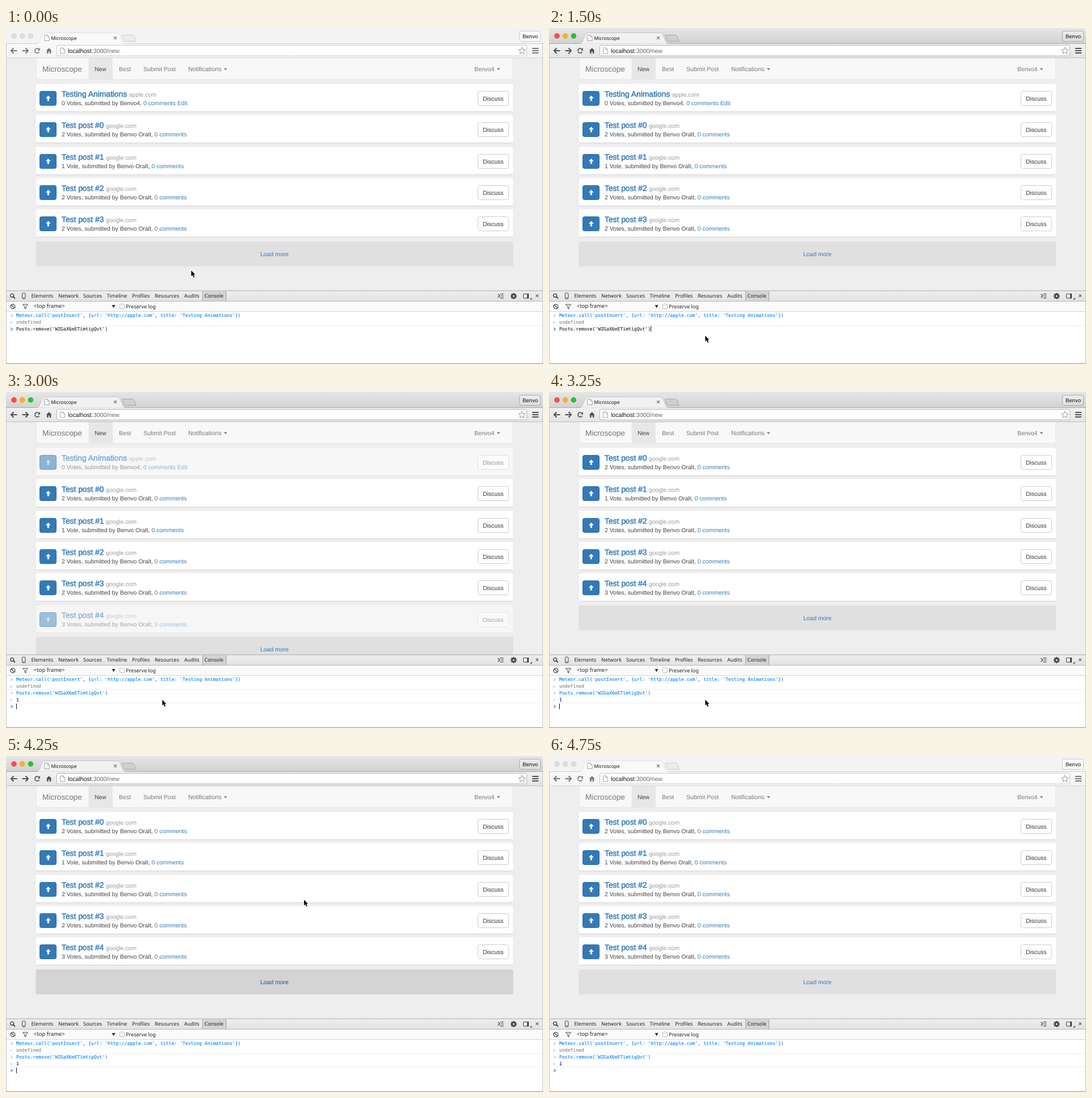
An HTML page with a canvas for the animation above (5.25 s loop, 946x592 px).

```html
<!DOCTYPE html>
<html lang="en">
<head>
<meta charset="utf-8">
<title>Microscope</title>
<style>
  html, body { margin: 0; width: 100%; height: 100%; overflow: hidden; background: #eee; }
  canvas { display: block; width: 946px; height: 592px; }
</style>
</head>
<body>
<canvas id="stage" width="946" height="592"></canvas>
<script>
const ctx = document.getElementById('stage').getContext('2d');
ctx.textRendering = 'geometricPrecision';
const LOOP = 5250;
const SANS = '"Liberation Sans", Arial, sans-serif';
const UI = '"Noto Sans", "Open Sans", sans-serif';
const MONO = '"DejaVu Sans Mono", monospace';
const LINK = '#337ab7';
const BODY = 10.45;

const between = (t, a, b) => t >= a && t < b;

function rect(x, y, w, h, fill) {
  ctx.fillStyle = fill;
  ctx.fillRect(x, y, w, h);
}

function box(x, y, w, h, r, fill, stroke) {
  ctx.beginPath();
  ctx.roundRect(x, y, w, h, r);
  if (fill) { ctx.fillStyle = fill; ctx.fill(); }
  if (stroke) { ctx.strokeStyle = stroke; ctx.lineWidth = 1; ctx.stroke(); }
}

// Draws text and returns the x position where it ends.
function text(str, x, y, size, color, family = SANS, weight = 0) {
  ctx.font = `${size}px ${family}`;
  ctx.fillStyle = color;
  ctx.fillText(str, x, y);
  if (weight) {
    ctx.strokeStyle = color;
    ctx.lineWidth = weight;
    ctx.strokeText(str, x, y);
  }
  return x + ctx.measureText(str).width;
}

function path(points, closed) {
  ctx.beginPath();
  points.forEach(([x, y], i) => i ? ctx.lineTo(x, y) : ctx.moveTo(x, y));
  if (closed) ctx.closePath();
}

function poly(points, fill) {
  path(points, true);
  ctx.fillStyle = fill;
  ctx.fill();
}

function line(points, color, width = 1, closed = false) {
  path(points, closed);
  ctx.strokeStyle = color;
  ctx.lineWidth = width;
  ctx.stroke();
}

function arc(x, y, r, color, width = 1, from = 0, to = Math.PI * 2) {
  ctx.beginPath();
  ctx.arc(x, y, r, from, to);
  ctx.strokeStyle = color;
  ctx.lineWidth = width;
  ctx.stroke();
}

function dot(x, y, r, fill) {
  ctx.beginPath();
  ctx.arc(x, y, r, 0, Math.PI * 2);
  ctx.fillStyle = fill;
  ctx.fill();
}

function shade(y0, y1, from, to) {
  const g = ctx.createLinearGradient(0, y0, 0, y1);
  g.addColorStop(0, from);
  g.addColorStop(1, to);
  return g;
}

const down = (x, y, w, h, color) => poly([[x, y], [x + w, y], [x + w / 2, y + h]], color);

function cross(x, y, r, color) {
  line([[x - r, y - r], [x + r, y + r]], color, 1.2);
  line([[x - r, y + r], [x + r, y - r]], color, 1.2);
}

function pageIcon(x, y) {
  const outline = [[x, y], [x + 5, y], [x + 8, y + 3], [x + 8, y + 10], [x, y + 10]];
  poly(outline, '#fff');
  line(outline, '#999', 0.9, true);
  line([[x + 5, y], [x + 5, y + 3], [x + 8, y + 3]], '#999', 0.8);
}

function drawTabs(active) {
  rect(0, 0, 946, 28, active ? shade(0, 28, '#e6e6e6', '#d1d1d1') : '#f3f3f3');
  const edge = active ? '#a9a9a9' : '#cccccc';
  const lights = active ? ['#fc4a48', '#fdb024', '#29c231'] : ['#dedede', '#dedede', '#dedede'];
  lights.forEach((color, i) => {
    dot(14 + i * 14.7, 14, 4.7, color);
    arc(14 + i * 14.7, 14, 4.5, 'rgba(0,0,0,.1)', 0.6);
  });

  ctx.beginPath();
  ctx.moveTo(0, 27.5);
  ctx.lineTo(55, 27.5);
  ctx.bezierCurveTo(62, 27, 61, 9, 68, 9);
  ctx.lineTo(196, 9);
  ctx.bezierCurveTo(203, 9, 203, 27, 210, 27.5);
  ctx.lineTo(946, 27.5);
  ctx.strokeStyle = edge;
  ctx.lineWidth = 1;
  ctx.stroke();
  ctx.fillStyle = active ? '#f1f1f1' : '#f9f9f9';
  ctx.fill();

  const newTab = [[204.5, 12.5], [223, 12.5], [226, 15], [229, 23.5], [211, 23.5], [208.5, 22]];
  poly(newTab, active ? '#cfcfcf' : '#ececec');
  line(newTab, edge, 1, true);

  pageIcon(68, 12.5);
  text('Microscope', 79.5, 20.8, 8.4, '#111', UI);
  cross(192.5, 17.5, 2.3, '#666');
  box(904.5, 5.5, 37, 18, 3, active ? shade(5, 24, '#ececec', '#dedede') : '#fbfbfb', active ? '#aaa' : '#c8c8c8');
  text('Benvo', 910, 18, 9.5, '#111');
}

function drawToolbar(active) {
  rect(0, 28, 946, 25, active ? shade(28, 53, '#f1f1f1', '#e4e4e4') : shade(28, 53, '#f9f9f9', '#f3f3f3'));
  rect(0, 52, 946, 1, active ? '#bdbdbd' : '#d5d5d5');
  const ink = active ? '#505050' : '#777';
  for (const [x, dir] of [[14, 1], [34, -1]]) {
    line([[x - 5 * dir, 40], [x + 5.5 * dir, 40]], ink, 2);
    line([[x - 0.5 * dir, 35.3], [x - 5 * dir, 40], [x - 0.5 * dir, 44.7]], ink, 2);
  }
  arc(55, 40, 4, ink, 1.7, 0.5, 5.4);
  poly([[60, 35], [60, 39.5], [55.5, 39.5]], ink);
  poly([[70.7, 40.3], [75.7, 35.2], [80.7, 40.3], [79.3, 40.3], [79.3, 45], [76.8, 45],
    [76.8, 41.5], [74.6, 41.5], [74.6, 45], [72.1, 45], [72.1, 40.3]], ink);

  box(89.5, 30.5, 828, 18.5, 2, '#fff', active ? '#b5b5b5' : '#cacaca');
  pageIcon(95.5, 35);
  const end = text('localhost', 109, 43.5, 10.6, '#111');
  text(':3000/new', end, 43.5, 10.6, '#666');

  const star = Array.from({ length: 10 }, (_, i) => {
    const a = -Math.PI / 2 + i * Math.PI / 5, r = i % 2 ? 3 : 6.4;
    return [909 + r * Math.cos(a), 40.3 + r * Math.sin(a)];
  });
  line(star, '#888', 0.9, true);
  for (const y of [35, 39, 43]) rect(927, y, 11, 2, ink);
}

function drawNav() {
  box(53.5, 51.5, 839, 39, 2, '#f8f8f8', '#e7e7e7');
  rect(145.5, 53, 42.5, 38, '#e7e7e7');
  text('Microscope', 64, 77, 13.7, '#777');
  text('New', 156, 76.2, BODY, '#444');
  text('Best', 199, 76.2, 10.55, '#777');
  text('Submit Post', 242, 76.2, 10.55, '#777');
  text('Notifications', 321, 76.2, 10.75, '#777');
  down(383.7, 71, 6, 3.2, '#777');
  text('Benvo4', 825, 76.2, BODY, '#777');
  down(864.5, 71, 6, 3.2, '#777');
}

const testPost = (n, votes) => ({
  title: `Test post #${n}`, site: 'google.com',
  votes: votes === 1 ? '1 Vote' : `${votes} Votes`, author: 'Benvo Oralt', links: '0 comments',
});
const newest = {
  title: 'Testing Animations', site: 'apple.com',
  votes: '0 Votes', author: 'Benvo4', links: '0 comments Edit',
};
const posts = [2, 1, 2, 2, 3].map((votes, n) => testPost(n, votes));

const rowY = row => Math.round(99 + row * 55.35);

function drawPost(post, row, alpha = 1) {
  const y = rowY(row);
  ctx.globalAlpha = alpha;
  rect(54, y + 48, 838, 1, '#d2d2d2');
  box(53, y - 0.5, 840, 48.5, 2.5, '#fff');

  box(59.5, y + 12.5, 29, 25, 3, LINK, '#2e6da4');
  poly([[74.4, y + 20], [78.8, y + 24.7], [76, y + 24.7], [76, y + 29.6],
    [72.8, y + 29.6], [72.8, y + 24.7], [70, y + 24.7]], '#fff');

  const end = text(post.title, 98, y + 21.7, 13.8, LINK, SANS, 0.5);
  text(post.site, end + 3.5, y + 21.7, BODY, '#999');
  const x = text(`${post.votes}, submitted by ${post.author}, `, 98, y + 36.7, BODY, '#444');
  text(post.links, x, y + 36.7, BODY, LINK);

  box(831.5, y + 12.5, 54, 25, 3, '#fff', '#ccc');
  text('Discuss', 840, y + 29, BODY, '#333');
  ctx.globalAlpha = 1;
}

function drawLoadMore(row, hover) {
  const y = rowY(row);
  box(52.5, y, 841, 44, 2.5, hover ? '#d4d4d4' : '#e0e0e0');
  text('Load more', 448, y + 25.8, BODY, hover ? '#23527c' : LINK);
}

function drawPage(t) {
  const fading = between(t, 3000, 3250);
  rect(0, 53, 946, 410, '#eee');
  drawNav();
  if (t >= 3250) {
    posts.forEach((post, i) => drawPost(post, i));
  } else {
    drawPost(newest, 0, fading ? 0.54 : 1);
    posts.slice(0, 4).forEach((post, i) => drawPost(post, i + 1));
    if (fading) drawPost(posts[4], 5, 0.45);
  }
  drawLoadMore(fading ? 6 : 5, between(t, 4250, 4500));
}

function chevron(y, color, width) {
  line([[8.5, y - 2.3], [11.5, y], [8.5, y + 2.3]], color, width);
}

function resultMark(y) {
  line([[10, y - 2], [7.5, y], [10, y + 2]], '#aaa', 0.9);
  dot(11.8, y, 0.6, '#aaa');
}

function drawDevToolbars() {
  const ink = '#444';
  rect(0, 463, 946, 19, shade(463, 482, '#eeeeee', '#e2e2e2'));
  rect(0, 462.5, 946, 1, '#aaa');
  rect(0, 481, 946, 1, '#b8b8b8');
  rect(0, 482, 946, 17.5, '#fafafa');
  rect(0, 499, 946, 1, '#d5d5d5');
  rect(0, 500, 946, 92, '#fff');

  arc(10.8, 471.3, 2.9, ink, 1.4);
  line([[13, 473.5], [16, 476.7]], ink, 1.9);
  box(28.5, 467, 5.5, 10, 1.2, null, ink);
  rect(30, 475, 2.5, 1, ink);

  const tabs = { Elements: 44.5, Network: 92, Sources: 136, Timeline: 177.5,
    Profiles: 222, Resources: 262, Audits: 314 };
  for (const name in tabs) text(name, tabs[name], 475.4, 8.95, '#222', UI);
  rect(346, 464, 42, 17, '#d4d4d4');
  rect(346, 464, 1, 17, '#a0a0a0');
  rect(387, 464, 1, 17, '#a0a0a0');
  text('Console', 349.5, 475.4, 8.95, '#222', UI);

  line([[866.5, 469], [870, 472], [866.5, 475]], ink, 1.3);
  for (const y of [468, 475]) rect(870.5, y, 6, 1.2, ink);
  rect(872, 471.5, 4.5, 1.2, ink);
  for (let i = 0; i < 4; i++) {
    const a = i * Math.PI / 4, c = 5.6 * Math.cos(a), s = 5.6 * Math.sin(a);
    line([[894.3 - c, 472.3 - s], [894.3 + c, 472.3 + s]], ink, 2);
  }
  arc(894.3, 472.3, 3, ink, 2.6);
  dot(894.3, 472.3, 1.6, '#e8e8e8');
  box(911.5, 468.5, 9, 7.5, 0.5, null, ink);
  rect(918, 468, 3, 8.5, ink);
  poly([[926.5, 475], [926.5, 478.5], [923, 478.5]], ink);
  cross(935.7, 471.8, 2.1, '#555');

  arc(12, 490.7, 3.9, ink, 1.3);
  line([[9.2, 488], [14.8, 493.4]], ink, 1.3);
  line([[29.5, 487], [38.5, 487], [35, 491], [35, 495], [33, 494], [33, 491]], ink, 1, true);
  text('<top frame>', 49, 493.4, 9.45, '#222', UI);
  down(186.5, 488, 6, 5.5, '#333');
  box(200.5, 486.5, 8, 8, 1, '#fff', '#b5b5b5');
  text('Preserve log', 211, 493.6, 9.05, '#222', UI);
}

function drawConsole(t) {
  drawDevToolbars();
  const removed = t >= 3000;
  const blue = '#0080ff', prompt = '#2f86f0';
  const mono = (str, y, color) => text(str, 18, y, 8.12, color, MONO, 0.12);

  chevron(506.8, '#999', 0.9);
  mono("Meteor.call('postInsert', {url: 'http://apple.com', title: 'Testing Animations'})", 509.3, blue);
  resultMark(518.8);
  mono('undefined', 521.3, '#808080');
  rect(1, 524, 944, 1, '#f0f0f0');
  chevron(530.6, removed ? '#999' : prompt, removed ? 0.9 : 1.3);
  mono("Posts.remove('WZGaX6eETimtigQvt')", 533, removed ? blue : '#222');
  if (removed) {
    resultMark(542.5);
    mono('1', 545, '#1c00cf');
    rect(1, 547.5, 944, 1, '#f0f0f0');
    chevron(554.3, prompt, 1.3);
  }
  if (between(t, 1500, 2000) || between(t, 2500, 3000)) rect(179, 525, 1, 10, '#111');
  if (between(t, 3000, 3500) || between(t, 4000, 4500)) rect(18, 549, 1, 10, '#111');
}

const pointerStops = [
  [0, 326, 427], [250, 301, 522], [500, 281, 537], [750, 275, 544],
  [1250, 275, 542], [4000, 275, 546], [4250, 524.7, 253],
];

function drawPointer(t) {
  if (t >= 4500) return;
  const [, x, y] = pointerStops.findLast(stop => t >= stop[0]);
  const arrow = [[0, 0], [0, 10], [2.3, 7.9], [4, 11.9], [5.8, 11.1], [4.1, 7.3], [7.1, 7.1]]
    .map(([dx, dy]) => [x + dx + 0.3, y + dy + 0.3]);
  line(arrow, '#fff', 1.4, true);
  poly(arrow, '#000');
}

function draw(t) {
  const active = between(t, 1500, 4750);
  drawTabs(active);
  drawPage(t);
  drawToolbar(active);
  drawConsole(t);
  rect(0, 28, 1, 564, '#c4c4c4');
  rect(945, 28, 1, 564, '#c4c4c4');
  rect(0, 590.5, 946, 1.5, '#b0b0b0');
  drawPointer(t);
}

const start = performance.now();
function tick() {
  draw((performance.now() - start) % LOOP);
  requestAnimationFrame(tick);
}
tick();
</script>
</body>
</html>
```
